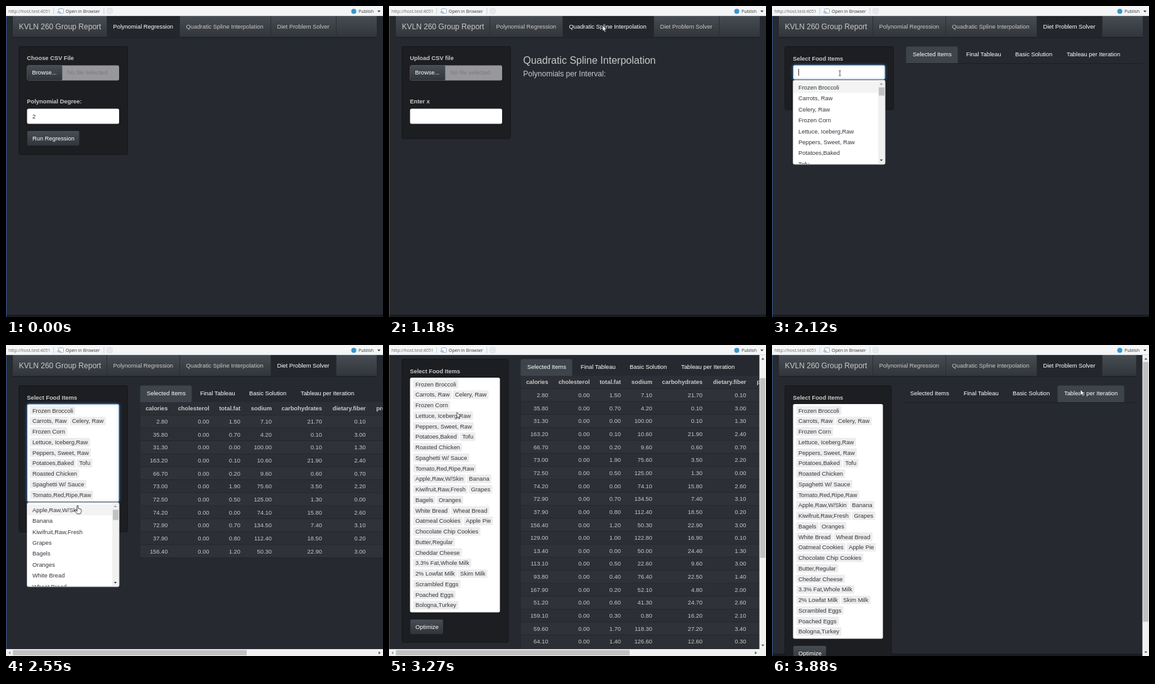
These frames come from a looping animation (600x495 px, 3.91 s). An HTML page with a canvas:

```html
<!DOCTYPE html>
<html lang="en">
<head>
<meta charset="utf-8">
<title>Numerical methods app</title>
<style>
html, body { margin: 0; width: 100%; height: 100%; overflow: hidden; background: #262a30; }
canvas { display: block; width: 600px; height: 495px; }
</style>
</head>
<body>
<canvas id="stage" width="600" height="495"></canvas>
<script>
const ctx = document.getElementById('stage').getContext('2d');
const LOOP = 3910, TOP = 16;
const SANS = '"Liberation Sans", Arial, sans-serif';
const MONO = '"DejaVu Sans Mono", monospace';
const BAR_FONT = '"Open Sans", sans-serif';
const BODY = 9.36;
const BG = '#262a30', TEXT = '#c8c8c8', DARK = '#32363b';

// When things happen, in ms
const AT = { uploadA: 310, plot: 610, spline: 1180, uploadB: 1520, typed: 1640, four: 1815, five: 1880,
  diet: 1990, open: 2080, pick: 2170, pickStep: 36, close: 3250, optimize: 3390,
  finalTab: 3640, basicTab: 3750, iterTab: 3850 };

const FOODS = ['Frozen Broccoli', 'Carrots, Raw', 'Celery, Raw', 'Frozen Corn', 'Lettuce, Iceberg,Raw',
  'Peppers, Sweet, Raw', 'Potatoes,Baked', 'Tofu', 'Roasted Chicken', 'Spaghetti W/ Sauce',
  'Tomato,Red,Ripe,Raw', 'Apple,Raw,W/Skin', 'Banana', 'Kiwifruit,Raw,Fresh', 'Grapes', 'Bagels', 'Oranges',
  'White Bread', 'Wheat Bread', 'Oatmeal Cookies', 'Apple Pie', 'Chocolate Chip Cookies', 'Butter,Regular',
  'Cheddar Cheese', '3.3% Fat,Whole Milk', '2% Lowfat Milk', 'Skim Milk', 'Scrambled Eggs', 'Poached Eggs',
  'Bologna,Turkey'];
const MENU = [...FOODS.slice(0, 27), 'Poached Eggs', 'Scrambled Eggs', 'Bologna Turkey',
  'Beef Sausage', 'Sliced Ham', 'Pork Sausage', 'Popcorn', 'Pretzels', 'Tortilla Chips', 'Tomato Soup'];

// Table columns: heading, right edge, typical largest value
const COLUMNS = [['calories', 253.5, 180], ['cholesterol', 319.5, 0], ['total.fat', 369, 2], ['sodium', 419, 140],
  ['carbohydrates', 499, 30], ['dietary.fiber', 568.5, 3.5], ['protein', 617, 8]];

const OUTPUT = ['$augcoeffmatrix',
  '       [,1]     [,2]       [,3]       [,4]',
  '[1,]     97     4907     329901     489238',
  '[2,]   4907   329901   24949793   23849190',
  '[3,] 329901 24949793 2012337729 1578992820', '',
  '$coefficients',
  '         [,1]      [,2]      [,3]',
  '[1,] 5793.599 -22.35764 0.1120573', '',
  '$polynomial_string',
  '[1] "function(x) 5793.59930474314 * x ^ 0 + -22.3576449012344 * x ^ 1 + 0.1120573'];

// Pointer stops: arrival time, x, y
const STOPS = [[30, 555, 8], [190, 65, 104], [450, 76, 208], [820, 181, 167], [1170, 340, 31], [1380, 62, 104],
  [1740, 171, 174], [1985, 470, 31], [2070, 108, 107], [3370, 62, 446], [3510, 281, 331],
  [3635, 333, 74], [3745, 413, 74], [3850, 491, 71]];

function ramp(t, from, to) {
  const u = Math.max(0, Math.min(1, (t - from) / (to - from)));
  return u * u * (3 - 2 * u);
}
function random(i, seed) {
  const v = Math.sin(i * 12.9898 + seed * 78.233) * 43758.5453;
  return v - Math.floor(v);
}
function pointerAt(t) {
  return STOPS.reduce(([x, y], [arrive, nx, ny]) => {
    const u = ramp(t, arrive - 100, arrive);
    return [x + (nx - x) * u, y + (ny - y) * u];
  }, STOPS[0].slice(1));
}

function text(s, x, y, { size = BODY, color = TEXT, bold = false, align = 'left', font = SANS } = {}) {
  ctx.font = `${bold ? 'bold ' : ''}${size}px ${font}`;
  ctx.fillStyle = color;
  ctx.textAlign = align;
  ctx.fillText(s, x, y);
}
function rect(x, y, w, h, fill) { ctx.fillStyle = fill; ctx.fillRect(x, y, w, h); }
function box(x, y, w, h, fill, stroke, r = 2.5, weight = 1) {
  ctx.beginPath();
  ctx.roundRect(x, y, w, h, r);
  ctx.fillStyle = fill;
  ctx.fill();
  if (stroke) { ctx.strokeStyle = stroke; ctx.lineWidth = weight; ctx.stroke(); }
}
function poly(points, fill, stroke) {
  ctx.beginPath();
  points.forEach(([x, y]) => ctx.lineTo(x, y));
  ctx.closePath();
  if (fill) { ctx.fillStyle = fill; ctx.fill(); }
  if (stroke) { ctx.strokeStyle = stroke; ctx.lineWidth = .8; ctx.stroke(); }
}
function line(x1, y1, x2, y2, color, width = 1) {
  ctx.beginPath();
  ctx.moveTo(x1, y1);
  ctx.lineTo(x2, y2);
  ctx.strokeStyle = color;
  ctx.lineWidth = width;
  ctx.stroke();
}
function clipped(x, y, w, h, draw) {
  ctx.save();
  ctx.beginPath();
  ctx.rect(x, y, w, h);
  ctx.clip();
  draw();
  ctx.restore();
}
function glow(x, y, w, h) {
  ctx.save();
  ctx.shadowColor = 'rgba(70, 130, 190, .6)';
  ctx.shadowBlur = 4;
  box(x, y, w, h, '#fff', '#3f6f9f');
  ctx.restore();
}
function sheen(y, h) {
  const g = ctx.createLinearGradient(0, y, 0, y + h);
  g.addColorStop(0, '#484e55');
  g.addColorStop(.6, '#3a3f44');
  g.addColorStop(1, '#313539');
  return g;
}
function triangle(x, y, dir, color) { poly([[x - 2.5, y - dir * 1.3], [x + 2.5, y - dir * 1.3], [x, y + dir * 1.6]], color); }

function button(label, x, y, w, focus) {
  box(x, y, w, 24, focus ? '#3a3f44' : sheen(y, 24), focus ? '#e5a675' : '#1e2125', 2.5, focus ? 1.6 : 1);
  text(label, x + 8.5, y + 15, { color: '#fff' });
}
function well(bottom, right) { box(20.5, 64.5, right - 7, bottom - 64.5, '#1c1e22', '#15171a'); }
function label(s, y) { text(s, 33.3, y, { bold: true }); }

function upload(right, name, done) {
  box(33.5, 94.5, right - 33.5, 24, '#98989b');
  clipped(89, 94, right - 97, 25, () => text(name || 'No file selected', 97.5, 109, { color: name ? '#333' : '#7b7b80' }));
  box(33.5, 94.5, 56, 24, sheen(94, 24));
  text('Browse...', 41.5, 109, { color: '#fff' });
  if (done > 0) {
    box(33.5, 119.5, (right - 33.5) * done, 12.5, '#7a8288');
    if (done === 1) text('Upload complete', (33 + right) / 2, 129, { size: 8, color: '#fff', align: 'center' });
  }
}

function navbar(active, right) {
  rect(11, TOP, right - 11, 34, sheen(TOP - 2, 36));
  rect(10.5, 49.5, right - 10.5, 1, '#16181b');
  text('KVLN 260 Group Report', 20.5, 37, { size: 12.03 });
  const tabs = [['Polynomial Regression', 160.5], ['Quadratic Spline Interpolation', 276.5], ['Diet Problem Solver', 421.5]];
  tabs.forEach(([name, x], i) => {
    const end = i < 2 ? tabs[i + 1][1] : 525.5;
    if (i === active) rect(x, TOP, end - x, 34, '#23262b');
    line(x, TOP, x, 50, '#2b2f33');
    text(name, x + 10, 36, { color: i === active ? '#fff' : TEXT });
  });
  line(525.5, TOP, 525.5, 50, '#2b2f33');
}

function plot() {
  const ink = '#222', small = { size: 8, color: ink, align: 'center' };
  const px = v => 257.5 + v * 2.875, py = v => 277 - v * .01677;
  const upright = (s, x, y) => {
    ctx.save();
    ctx.translate(x, y);
    ctx.rotate(-Math.PI / 2);
    text(s, 0, 0, small);
    ctx.restore();
  };
  rect(209.5, 64, 368, 268, '#fff');
  text('2', 403, 87.5, { size: 9.5, color: '#000', bold: true, align: 'center' });
  ctx.strokeStyle = '#555';
  ctx.lineWidth = .8;
  ctx.strokeRect(248.5, 102.5, 308.5, 181);
  for (let i = 0; i < 6; i++) {
    const x = px(i * 20), y = py(i * 2000);
    line(x, 283.5, x, 288, '#555', .8);
    line(244, y, 248.5, y, '#555', .8);
    text(i * 20, x, 299, small);
    upright(i * 2000, 238, y);
  }
  text('X', 403, 319.5, small);
  upright('Y', 218, 193);
  ctx.strokeStyle = '#e4606d';
  for (let x = 1; x <= 100; x++) {
    ctx.beginPath();
    ctx.arc(px(x), py(random(x, 1) * 10000), 2, 0, 7);
    ctx.stroke();
  }
  ctx.beginPath();
  for (let x = 1; x <= 100; x++) ctx.lineTo(px(x), py(5793.599 - 22.35764 * x + .1120573 * x * x));
  ctx.strokeStyle = '#4ef04e';
  ctx.lineWidth = 1.3;
  ctx.stroke();
}

function regression(t, right) {
  well(236.5, right);
  label('Choose CSV File', 86);
  const done = ramp(t, AT.uploadA, AT.uploadA + 60);
  upload(right, done > 0 ? 'TestCasesPolynomial.csv' : '', done);
  label('Polynomial Degree:', 155);
  box(33.5, 163.5, right - 33.5, 24, '#fff');
  text('2', 42, 178.5, { color: '#272b30' });
  button('Run Regression', 33.5, 198.5, 83.5);
  if (t < AT.plot) return;
  plot();
  box(209.5, 332.5, 360, 230, '#f3f3f4', '#ccc');
  clipped(210, 333, 359, 200, () => OUTPUT.forEach((s, i) =>
    text(s, 217, 348 + i * 12.4, { size: 7.92, font: MONO, color: '#3a3f44' })));
}

function spline(t, right) {
  const loaded = t >= AT.uploadB, typed = t >= AT.typed;
  well(211, right);
  label('Upload CSV file', 86);
  upload(right, loaded ? 'TestCasesQuadratic.csv' : '', loaded ? 1 : 0);
  label('Enter x', 155);
  (typed ? glow : box)(33.5, 163.5, right - 33.5, 24, '#fff');
  if (typed) {
    text(t < AT.four ? '3' : t < AT.five ? '4' : '5', 42, 178.5, { color: '#272b30' });
    rect(47.5, 170, .8, 11, '#222');
    rect(162, 170, 10, 11, '#e8e8e8');
    triangle(167, 173, -1, '#444');
    triangle(167, 178, 1, '#444');
  }
  text('Quadratic Spline Interpolation', 213.5, 92, { size: 16.03 });
  text('Polynomials per Interval:', 213.5, 111.5, { size: 12.03 });
  if (!loaded) return;
  ['data', 'function(x) -1*x + 5.5', 'function(x) 0.639999999999999*x^2 + -6.75999999999999*x + 18.46',
    'function(x) -1.59999999999999*x^2 + 24.5999999999999*x + -91.2999999999997'].forEach((s, i) => {
    tableRow(i, 214, 121, 358);
    text(s, 221.5, 134.5 + i * 20.65, { bold: !i });
  });
  text('Estimate of f(x):', 213.5, 227, { size: 12.03 });
  text(t < AT.four ? 'NA' : t < AT.five ? '1.5' : '0.66', 213.5, 247);
}

function tagRows(n) {
  ctx.font = `${BODY}px ${SANS}`;
  const tags = [];
  let x = 38.5, row = 0;
  for (const name of FOODS.slice(0, n)) {
    const w = ctx.measureText(name).width + 6.8;
    if (x > 39 && x + w > 169) { x = 38.5; row++; }
    tags.push({ name, x, row, w });
    x += w + 1.8;
  }
  return { tags, bottom: 94 + Math.max(23, (row + 1) * 16.75 + 5) };
}

function dropdown(n, y, right) {
  const chosen = FOODS.slice(0, n).map(s => s.replace('Bologna,', 'Bologna '));
  box(33.5, y, right - 33.5, 134, '#fff', '#bbb');
  rect(34, y + 3, right - 45, 17.4, '#f3f3f3');
  clipped(34, y, right - 34, 133.5, () => {
    MENU.filter(s => !chosen.includes(s)).slice(0, 8).forEach((s, i) =>
      text(s, 42, y + 15 + i * 17.4, { color: DARK }));
    rect(right - 11, y, 10.5, 134, '#f1f1f1');
    rect(right - 10, y + 11.5, 9, 13 + n * .3, '#c1c1c1');
    triangle(right - 6, y + 6, -1, '#999');
    triangle(right - 6, y + 127.5, 1, '#444');
  });
}

function tableRow(i, x, top, width) {
  const y = top + i * 20.65;
  rect(x, y, width, 20.65, i % 2 ? '#2f3238' : '#2c2f35');
  rect(x, y + 20, width, .8, '#202327');
}

// Amounts skewed towards the small end
function amount(row, col) {
  return (COLUMNS[col][2] * random(row + 1, col + 2) ** 1.6).toFixed(1) + '0';
}
function tableau(row, col) {
  return (Math.max(0, random(row, col) - .6) * 90).toFixed(2);
}

function table(x0, width, count, head, cell) {
  tableRow(0, x0, 91, width);
  for (let r = 1; r <= count; r++) tableRow(r, x0, 91, width);
  COLUMNS.forEach(([name, edge], c) => {
    const x = edge + x0 - 210;
    text(head(name, c), x, 104, { bold: true, align: 'right' });
    for (let r = 0; r < count; r++) text(cell(r, c), x, 125 + r * 20.65, { align: 'right' });
  });
}

function diet({ t, n, tab, tags, bottom }, right, width) {
  const open = t >= AT.open && t < AT.close, optimized = t >= AT.optimize;
  well(bottom + (optimized ? 78 : 48), right);
  label('Select Food Items', 86.5);
  (open ? glow : box)(33.5, 94, right - 33.5, bottom - 94, '#fff');
  tags.forEach(({ name, x, row, w }) => {
    const y = 97.5 + row * 16.75;
    box(x, y, w, 13.6, '#ededee', null, 1.5);
    text(name, x + 3.4, y + 10.2, { color: DARK });
  });
  if (open && !n) rect(42, 100, .9, 11, '#222');
  button('Optimize', 33.5, bottom + 11, 53, optimized && tab === 0);
  if (optimized) {
    box(33.5, bottom + 35.5, right - 33.5, 28, '#f3f3f4', '#ccc');
    clipped(34, bottom + 36, right - 35, 28, () =>
      text('Optimal value:  1.37572388301', 41.5, bottom + 52, { size: 7.92, font: MONO, color: '#3a3f44' }));
  }

  const x0 = right < 178 ? 210 : 214, symbol = (_, c) => 'S' + (c + 1);
  rect(x0, 91, width - x0 - 10, 1, '#1c1e22');
  if (n && tab === 0) table(x0, width, n, name => name, amount);
  if (tab === 1) table(x0, width, 20, symbol, tableau);
  if (tab === 2) table(x0, width, 1, symbol, tableau);
  [['Selected Items', 10, 82], ['Final Tableau', 95, 75], ['Basic Solution', 173, 79], ['Tableau per Iteration', 255, 106]]
    .forEach(([name, x, w], i) => {
      if (i === tab) box(x0 + x - 10.5, 64.5, w, 26.5, '#3e444c', null, [2.5, 2.5, 0, 0]);
      text(name, x0 + x, 80, { color: '#fff' });
    });
  if (open) dropdown(n, bottom + 1, right);
}

function scrollbars(vertical, horizontal, height, view, scroll) {
  if (vertical) {
    const track = view - 22;
    rect(589.5, TOP, 10.5, view, '#f1f1f1');
    rect(590.5, TOP + 11 + scroll * track / height, 8.5, track * view / height, '#c1c1c1');
    triangle(595, TOP + 6, -1, '#555');
    triangle(595, TOP + view - 6, 1, '#555');
  }
  if (horizontal) {
    const w = vertical ? 589.5 : 600;
    rect(0, 484, 600, 11, '#f1f1f1');
    rect(11, 485.5, 372, 8.5, '#c1c1c1');
    poly([[7, 487.5], [7, 492.5], [4, 490]], '#999');
    poly([[w - 7, 487.5], [w - 7, 492.5], [w - 4, 490]], '#555');
  }
}

function toolbar() {
  const style = { size: 7, font: BAR_FONT, color: '#333' };
  rect(0, 0, 600, TOP, '#f3f5f7');
  rect(0, 15, 600, 1, '#d5d9dd');
  text('http://host.test:4051', 4, 11, { ...style, color: '#666' });
  rect(75.5, 3, .8, 10, '#c4c8cc');
  box(83.5, 4.5, 8, 7, '#fff', '#9bb0c4', 1);
  poly([[81.5, 9], [84.5, 9], [84.5, 7], [87.5, 10], [84.5, 13], [84.5, 11], [81.5, 11]], '#a9c3dc');
  text('Open in Browser', 95, 11, style);
  rect(155.5, 3, .8, 10, '#c4c8cc');
  box(161, 4, 8, 8, '#f3f5f7', '#d2d5d8', 2);
  ctx.beginPath();
  ctx.arc(165, 8, 2, 0, 7);
  ctx.stroke();
  ctx.beginPath();
  ctx.arc(553.5, 8.5, 4, 0, 7);
  ctx.fillStyle = '#3b95cc';
  ctx.fill();
  text('Publish', 561, 11, style);
  triangle(593.5, 8.5, 1, '#333');
}

function pointer(kind, x, y) {
  ctx.save();
  ctx.translate(x, y);
  if (kind === 'beam') {
    line(0, -4, 0, 4, '#444', .9);
    line(-1.8, -4, 1.8, -4, '#444', .8);
    line(-1.8, 4, 1.8, 4, '#444', .8);
  } else if (kind === 'hand') {
    poly([[-1, 0], [1, 0], [1, 4.5], [5.5, 5.5], [6, 9], [4.5, 13], [-1, 13], [-4.5, 8], [-3, 7], [-1, 9]], '#fff', '#222');
  } else {
    poly([[0, 0], [0, 9], [2, 7.2], [3.4, 10.4], [4.9, 9.8], [3.5, 6.7], [6.2, 6.6]], '#fff', '#333');
  }
  ctx.restore();
}

function draw(t) {
  const page = t < AT.spline ? 0 : t < AT.diet ? 1 : 2;
  const n = t < AT.pick ? 0 : Math.min(FOODS.length, Math.floor((t - AT.pick) / AT.pickStep) + 1);
  const tab = t < AT.finalTab ? 0 : t < AT.basicTab ? 1 : t < AT.iterTab ? 2 : 3;
  const { tags, bottom } = tagRows(n);
  const scroll = 42 * (ramp(t, 2950, 3214) - ramp(t, 3550, 3620));

  const horizontal = page === 2 && n > 0 && tab < 3;
  const view = horizontal ? 468 : 479;
  let height = 0;
  if (page === 0 && t >= AT.plot) height = 540;
  if (page === 2) {
    const rows = tab === 0 ? n : tab === 1 ? 22 : 0;
    height = Math.max(bottom + 62, 110 + rows * 20.65);
    if (t >= AT.open && t < AT.close) height = Math.max(height, bottom + 120);
  }
  const vertical = height > view;
  const width = vertical ? 589.5 : 600, right = vertical ? 176.5 : 180;

  rect(0, 0, 600, 495, BG);
  clipped(0, TOP, width, view, () => {
    rect(0, 491, 600, 4, '#1a1c20');
    ctx.save();
    ctx.translate(0, -scroll);
    navbar(page, vertical ? 579.5 : 590);
    if (page === 0) regression(t, right);
    else if (page === 1) spline(t, right);
    else diet({ t, n, tab, tags, bottom }, right, width);
    ctx.restore();
    rect(0, TOP, 1, view, '#35588f');
  });
  scrollbars(vertical, horizontal, height, view, scroll);
  toolbar();

  if (t < 30) return;
  const picking = t >= AT.pick && t < AT.close;
  const [x, y] = picking ? [114, bottom + 6 - scroll] : pointerAt(t);
  pointer(picking ? 'hand' : t >= 2050 && t < AT.pick ? 'beam' : 'arrow', x, y);
}

const start = performance.now();
function frame() {
  draw((performance.now() - start) % LOOP);
  requestAnimationFrame(frame);
}
frame();
</script>
</body>
</html>
```
